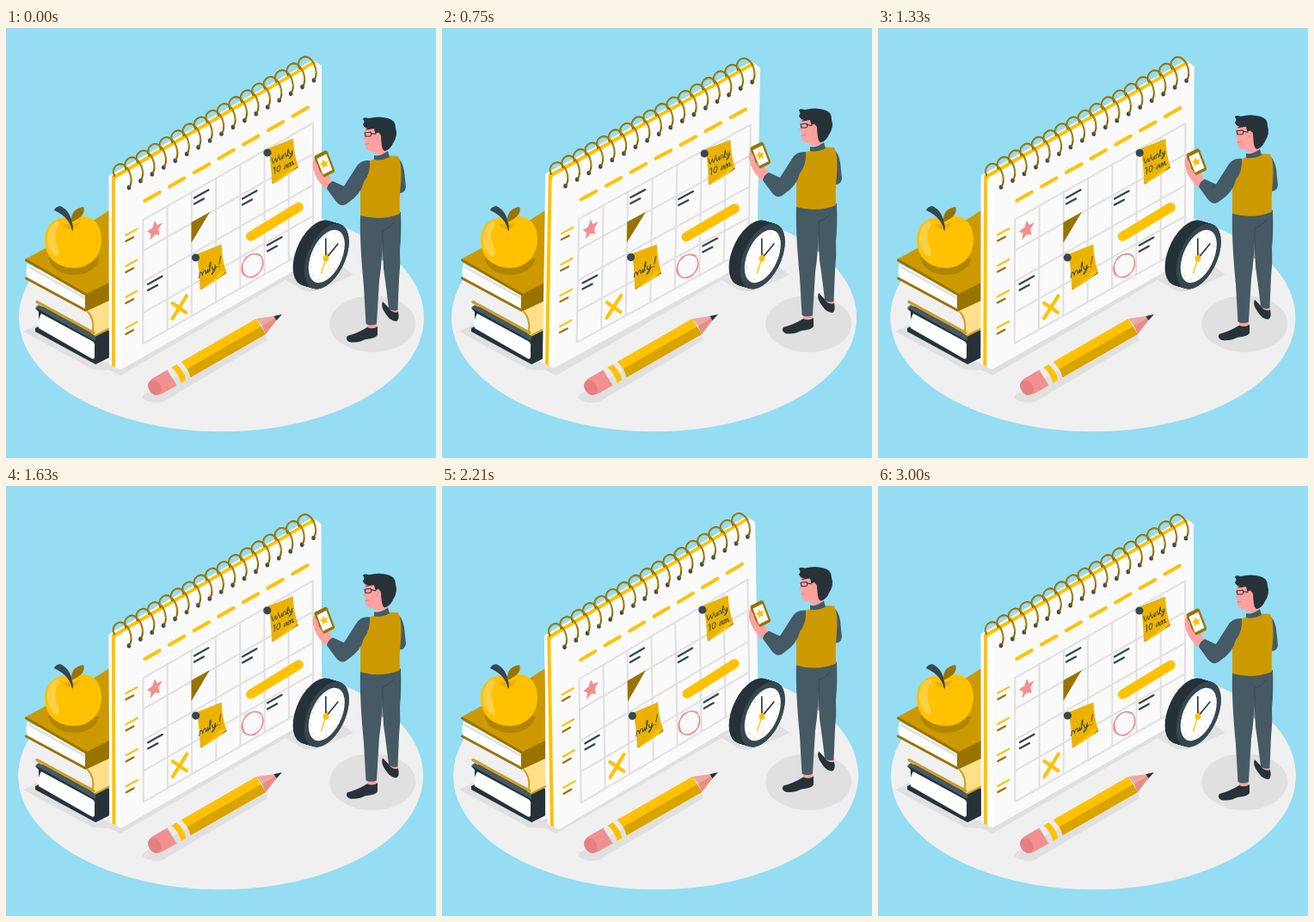
An HTML page with a canvas for the animation above (3040 ms loop, 500 by 500 pixels).

```html
<!DOCTYPE html>
<html lang="en">
<head>
<meta charset="utf-8">
<title>Planner</title>
<style>
html, body { margin: 0; width: 100%; height: 100%; overflow: hidden; background: #94ddf3; }
canvas { display: block; width: 500px; height: 500px; }
</style>
</head>
<body>
<canvas id="stage"></canvas>
<script>
const canvas = document.getElementById('stage');
const ctx = canvas.getContext('2d');
const dpr = window.devicePixelRatio || 1;
canvas.width = canvas.height = 500 * dpr;

const SKY = '#94ddf3', FLOOR = '#f0f0f0', SHADE = '#e0e0e0', WHITE = '#fff', PAGE = '#fafafa';
const YELLOW = '#ffc100', GOLD = '#cc9a00', BRONZE = '#997300', NOTE = '#ecb200', CREAM = '#ffe08a';
const SLATE = '#455a64', STEEL = '#37474f', INK = '#263238', PINK = '#f28f8f', SKIN = '#ffa2a0';
const LOOP = 3040, SPAN = 3000;

function fill(color, d) {
  ctx.fillStyle = color;
  ctx.fill(new Path2D(d));
}

function line(color, width, d) {
  ctx.strokeStyle = color;
  ctx.lineWidth = width;
  ctx.stroke(new Path2D(d));
}

function oval(color, x, y, rx, ry = rx) {
  ctx.fillStyle = color;
  ctx.beginPath();
  ctx.ellipse(x, y, rx, ry, 0, 0, 7);
  ctx.fill();
}

// Runs a drawing with a shifted origin on the wall plane.
function onWall(x, y, draw, sx = 0.866, slope = -0.5) {
  ctx.save();
  ctx.transform(sx, slope, 0, 1, x, y);
  draw();
  ctx.restore();
}

function star(color, r) {
  ctx.fillStyle = color;
  ctx.beginPath();
  for (let i = 0; i < 10; i++) {
    const a = i * Math.PI / 5 - Math.PI / 2, k = i % 2 ? r * 0.48 : r;
    ctx.lineTo(k * Math.cos(a), k * Math.sin(a));
  }
  ctx.fill();
}

// Linear interpolation over evenly spaced keys.
function keyed(keys, p) {
  const x = p * (keys.length - 1), i = Math.min(Math.floor(x), keys.length - 2);
  return keys[i] + (keys[i + 1] - keys[i]) * (x - i);
}

function shadows() {
  fill(SHADE, 'M20 353L36 345L118 390V398L101 397Z');
  fill(SHADE, 'M110 393L133 404L372 266V250Z');
  fill(SHADE, 'M324 292L343 304Q354 309 366 304L404 287L392 278Z');
  fill(SHADE, 'M160 426L158 430Q168 438 182 435L304 363L300 352Z');
  oval(SHADE, 426.3, 344, 50, 33);
}

function books() {
  fill(INK, 'M34 326L60 320L120 352V383L104 391L34 353V349L38 347L38 330Z');
  fill(WHITE, 'M41 332L100 364Q104 366 103 371V383Q102 386 99 384L38 349Q36 340 41 332Z');
  fill(SLATE, 'M34 325L38 322L104 358V364Z');
  fill(INK, 'M104 364L120 355V383L104 391Z');
  fill(FLOOR, 'M37 299L93 327L104 336V356L37 320Z');
  fill(CREAM, 'M93 328L120 314V350L104 358L99 355Q103 340 93 328Z');
  line('#c9a02c', 3.5, 'M36 318.5L102 354.5');
  line('#c9a02c', 2, 'M95 330Q103 338 101 353M104 357.5L120 349.5');

  fill(GOLD, 'M22 269L84 235L120 212V298L93 311Z');
  fill(WHITE, 'M25 274L93 312V327L25 291Q22 283 25 274Z');
  fill(SHADE, 'M26 276L93 313V316L26 279Z');
  line(BRONZE, 3, 'M23.5 270L93 310M23.5 291L92 328');
  fill(BRONZE, 'M92 310L120 296V317L92 330Z');
}

function apple() {
  fill('#b08500', 'M49 267Q55 287 80 287Q103 286 109 268Z');
  fill(YELLOW, 'M76 222C90 214 111 220 111 246C111 266 97 279 79 279C60 279 45 267 45 246C45 228 60 217 76 222Z');
  fill('#ffcf45', 'M57 226C44 235 45 258 59 266C64 265 61 257 59 251C56 242 57 235 62 229Q62 223 57 226Z');
  fill('#eaac00', 'M66 227Q76 231 87 225Q82 234 75 234Q69 234 66 227Z');
  fill(STEEL, 'M77 236Q74 220 56 212Q57 208 63 207Q77 213 78 235Z');
  fill(BRONZE, 'M76 226Q75 210 90 208Q94 218 76 226Z');
}

function note(x, y, body, pinX, pinY) {
  ctx.save();
  ctx.translate(x, y);
  fill(BRONZE, 'M4 33L33 18L35 22L5 41.5Z');
  fill(NOTE, 'M0 0L29 -11.5Q30 8 34.5 20Q22 33 4 41Q4 20 0 0Z');
  fill(YELLOW, 'M34.5 20Q22 33 4 41Q18 33 28 20Z');
  ctx.restore();
  onWall(x, y, body, 1, -0.48);
  oval(STEEL, pinX, pinY, 4.6);
}

function twoDashes(x, y, a = STEEL, b = STEEL, w = 2.3, k = 1) {
  line(a, w, `M${x} ${y}L${x + 16.5 * k} ${y - 9.2 * k}`);
  line(b, w, `M${x} ${y + 7}L${x + 11 * k} ${y + 7 - 6 * k}`);
}

function calendar(deg) {
  ctx.save();
  ctx.translate(246, 216);
  ctx.rotate(deg * Math.PI / 180);
  ctx.translate(-246, -216);

  fill(WHITE, 'M119.5 172L355 38L360 39L367 44V264L133 397.5L120 391Z');
  fill(YELLOW, 'M123 172.5L357 38.5L361 40.5L129 174L127 177V394.5L123 392.5Z');
  fill(PAGE, 'M133 179L366.5 45V263.5L133 397Z');

  // Header dashes and month grid
  for (let i = 0; i < 7; i++) {
    const x = 161.3 + i * 28.7, y = 201 - i * 16.4;
    line(YELLOW, 4, `M${x} ${y}l17.5 -10`);
  }
  ctx.lineCap = 'butt';
  for (let i = 0; i < 8; i++) {
    const x = 159.3 + i * 28.25;
    line(SHADE, 2, `M${x} ${223 - i * 16.15}v144`);
  }
  for (let i = 0; i < 5; i++) line(SHADE, 2, `M159 ${223.3 + i * 36}l198.5 -113.2`);
  ctx.lineCap = 'round';
  for (let i = 0; i < 4; i++) twoDashes(139.3, 241 + i * 36, YELLOW, BRONZE, 2.2, 0.8);

  onWall(173, 235, () => star(PINK, 11));
  fill(BRONZE, 'M215.5 226L237 214L215.5 250Z');
  twoDashes(219, 197.5);
  twoDashes(275, 198.5);
  twoDashes(165, 298);
  twoDashes(304, 252.5);
  line(YELLOW, 11, 'M284.5 242.2L340.3 208.2');
  line(YELLOW, 4, 'M210 311.5L193.5 338M193.5 320L209.5 331');
  line(PINK, 1.3, 'M296 264C285 258 273 271 274 282C277 296 299 289 299 273C299 262 287 260 279 267C272 276 274 291 286 290C295 288 300 277 298 269');

  note(305, 140, () => line(STEEL, 0.9,
    'M4 13Q5 20 6 20Q8 16 8.5 15Q9 20 10 20Q12 16 12 13M13 16Q13 20 14.5 20Q16 19 16 16L16.5 20' +
    'M18 20V16Q20 14 20.5 17L21 20Q24 16 23.5 12Q22 12 22.5 18Q22.5 20 24 20' +
    'M25 16Q25 20 27 19L28 16Q28 23 25 24Q23.5 23 28 20' +
    'M6 26L7.5 25V33M13 26Q10 25 10 30Q11 34 13 32Q15 28 13 26' +
    'M22 29Q19 28 18.5 32Q20 34 22 29Q22 33 23 33M24 33V29Q26 27 26 33Q27 27 28.5 29V33L30 32'), 304, 145);
  note(221.5, 263, () => line(STEEL, 1,
    'M3 29L4 24Q6 22 7 28Q8 22 10.5 24L11 28Q13 27 13 24L13.5 28Q17 22 16.5 17Q14.5 17 15.5 27' +
    'M18 23Q18 28 20.5 27L22 23Q22 31 18 32Q17 30 24 26M28 16L26.5 24M26.3 27V27.3'), 220.5, 267);

  // Spiral binding
  for (let i = 0; i < 17; i++) {
    ctx.save();
    ctx.translate(i * 13.44, -i * 7.8);
    oval(STEEL, 143, 185.5, 2.3, 2.7);
    line('#866500', 2, 'M126 172C122 162 131 155 138 160C145 166 148 178 143.5 185');
    line(GOLD, 0.9, 'M126 170C123 162 131 156 138 160.5C143 165 145.5 171 145.5 177');
    ctx.restore();
  }
  ctx.restore();
}

// The pencil lies along its own x axis, starting at the eraser.
function pencil() {
  ctx.save();
  ctx.transform(1, -0.575, 0.55, 0.9, 173, 418);
  fill(PINK, 'M21 -10H3Q-6 -9 -6 0Q-6 9 3 10H21Z');
  oval('#e57f80', 0, 0, 6, 9);
  fill(SHADE, 'M20 -10H39V10H20Z');
  fill('#ebebeb', 'M20 -10H39V1H20Z');
  fill(YELLOW, 'M25 -10H31Q34 0 31 10H25Q28 0 25 -10Z');
  fill(YELLOW, 'M36 -10H123.5V10H36Q39 0 36 -10Z');
  fill('#d9a300', 'M38 0H123.5V10H36Q38 5 38 0Z');
  fill('#f0a79f', 'M123.5 -10L146 0L123.5 10Q126 0 123.5 -10Z');
  fill('#e58f89', 'M124.5 0H146L123.5 10Z');
  fill(INK, 'M140 -2.7L148 0L140 2.7Z');
  ctx.restore();
}

function clock() {
  const disc = (x, y, draw) => onWall(x, y, draw, 0.765, -0.5);
  for (let i = 0; i <= 12; i++) {
    disc(359.6 + i * 1.1, 261.5 + i * 0.33, () => oval(INK, 0, 0, 34));
  }
  disc(372.8, 265.5, () => {
    oval(STEEL, 0, 0, 34);
    oval(WHITE, 0, 0, 27.5);
    for (let i = 0; i < 12; i++) {
      ctx.save();
      ctx.rotate(i * Math.PI / 6);
      line('#c7c7c7', 1, 'M0 -25V-23');
      ctx.restore();
    }
  });
  line(INK, 1.6, 'M372 268L371.8 245M372 268L386 251');
  line(YELLOW, 1.3, 'M374 262L366.5 285');
  oval(YELLOW, 372, 268, 3.3, 3.8);
}

function man() {
  // Shoes and legs
  fill(SKIN, 'M446 326H456V334L447 332Z');
  fill(INK, 'M438 318Q444 324 448 329Q453 332 456 330Q458 339 454 341Q447 341 442 333Q435 324 438 318Z');
  fill(SKIN, 'M420 342H431V352Q424 354 420 349Z');
  fill(INK, 'M420 348Q427 351 432 347V357Q430 361 418 362Q408 367 399 365Q394 362 397 358Q409 355 420 348Z');
  fill(SLATE, 'M436 216L459 214Q460 240 458 258Q459 275 457 292L455.5 328Q449 330 445 326Q442 300 439 280Z');
  fill(SLATE, 'M412 216H458L454 225L438 235Q438 268 434 294L431 344Q425 347 418.5 344L416 300Q411 250 412 216Z');
  line(STEEL, 1, 'M438 270V235Q446 233 451 226');

  // Far sleeve, vest and collar
  fill(SLATE, 'M452 150Q460 151 463 166L465 185Q464 192 458 192L454 170Z');
  fill(GOLD, 'M424 154Q440 147 456 149Q461 159 459 181Q457 200 458 216Q436 225 412 218V190Q412 166 424 154Z');
  fill(SKIN, 'M424 132L442 130V148L428 146Z');
  fill(SLATE, 'M428 148Q435 150 444 143L446 150Q436 155 428 153Z');

  // Phone, hand and near arm
  fill(SKIN, 'M359 152Q356 154 357 163L363 175L371 186L379 181L377 174L369 166Z');
  fill(BRONZE, 'M358.5 151Q358 149 360 148L371 142.5Q373 142 374 144L382 165Q382.5 167 381 168L369 174Q367 174.5 366 172Z');
  fill(WHITE, 'M361.5 152L372.5 146.5L379.5 165L368.5 170.5Z');
  ctx.save();
  ctx.translate(370, 158);
  ctx.rotate(-0.3);
  star(YELLOW, 5.5);
  ctx.restore();
  fill(SKIN, 'M358 156Q362 154 364 165L370 174Q377 173 380 179L371 187Q360 175 358 166Z');
  fill(SLATE, 'M423 154Q412 153 407 162L393 184L380 178Q374 181 373 187L384 202Q391 210 398 203Q413 193 416 179Q424 169 423 154Z');
  line(STEEL, 1, 'M393 184L389 188');

  // Head
  fill(SKIN, 'M419 112Q416 120 417 125L415 129L418 131V139Q422 145 431 143L443 138L440 112Z');
  fill(INK, 'M415 106Q415 103 422 105Q434 102 444 105Q453 107 453 116Q456 125 450 134Q447 141 441 143Q438 143 437 137L436 128L433 121L430 125L428 117Q417 119 415 112Q418 109 415 106Z');
  oval(SKIN, 432, 127.5, 4.2, 5.5);
  line('#e57f80', 0.8, 'M434 125Q431 126 432 130');
  line(INK, 1.1, 'M417 122L424 121Q426 125 423 126L418 126ZM425 122.5L430 123.5');
  line(INK, 1.1, 'M419 118L424 117');
  line('#d96f70', 0.8, 'M418 135L422 134.5');
}

function draw(ms) {
  const p = Math.min(ms % LOOP, SPAN) / SPAN;
  const half = p * 2 % 1;
  const shake = keyed([0, -1, 2, -4, 4, -4, 4, -4, 2, -1, 0], half);
  const rise = keyed([0, -10, 0], half);
  const sway = keyed([0, 1, 0, -1, 0], p);

  ctx.setTransform(dpr, 0, 0, dpr, 0, 0);
  ctx.lineCap = ctx.lineJoin = 'round';
  ctx.fillStyle = SKY;
  ctx.fillRect(0, 0, 500, 500);
  oval(FLOOR, 250.5 + shake, 336.8, 235.5, 132.5);
  shadows();
  books();
  apple();
  calendar(sway);
  pencil();
  clock();
  ctx.save();
  ctx.translate(0, rise);
  man();
  ctx.restore();
}

const start = performance.now();
function tick(now) {
  draw(Math.max(0, now - start));
  requestAnimationFrame(tick);
}
draw(0);
requestAnimationFrame(tick);
</script>
</body>
</html>
```
